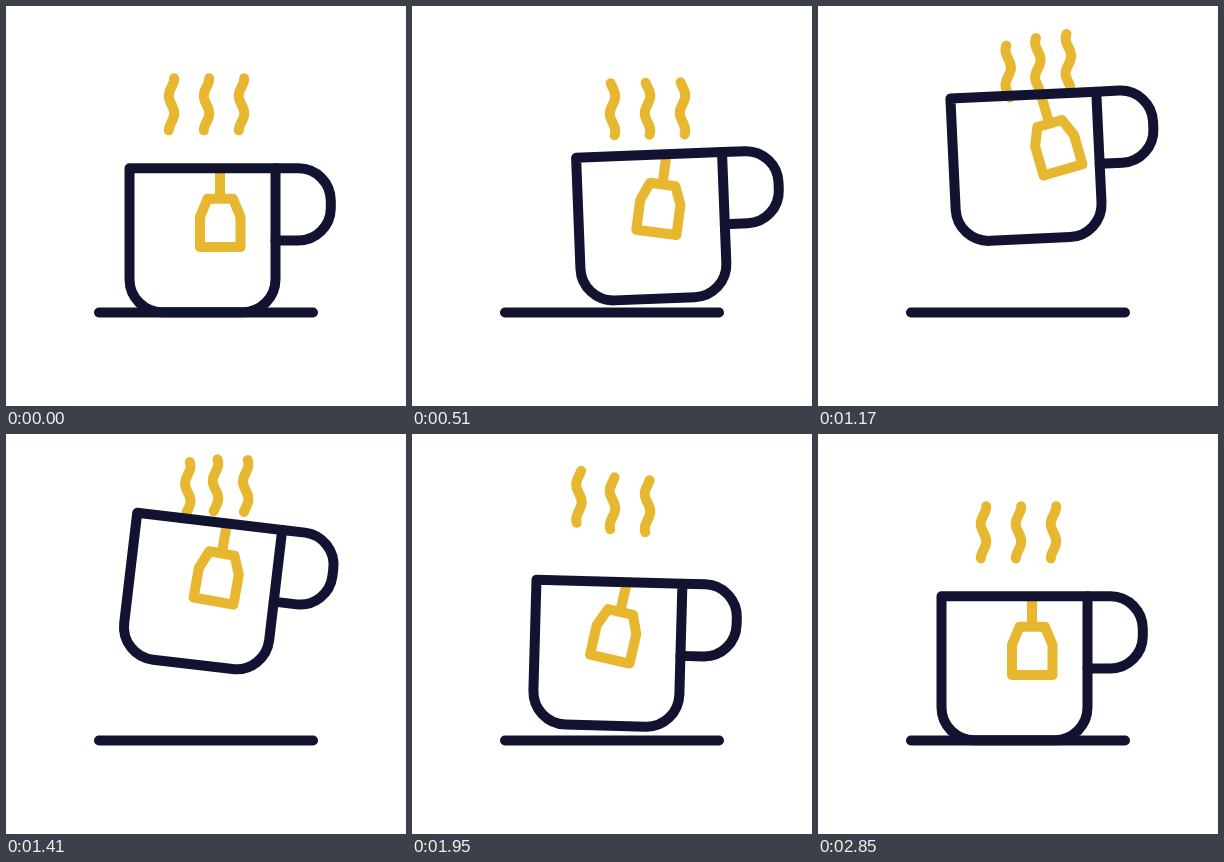
Animation of 400 by 400 pixels, one loop 2910 ms. Source, as an HTML page with a canvas:

```html
<!DOCTYPE html>
<html lang="en">
<head>
<meta charset="utf-8">
<title>Tea cup</title>
<style>
html, body { margin: 0; width: 100%; height: 100%; overflow: hidden; background: #fff; }
canvas { display: block; width: 100vw; height: 100vh; }
</style>
</head>
<body>
<canvas id="stage" width="400" height="400"></canvas>
<script>
const ctx = document.getElementById('stage').getContext('2d');
const LOOP = 2910, STEP = 30, LAST = 2850;
const NAVY = '#121331', GOLD = '#e8b730';
const RAD = Math.PI / 180;

// Sine ease from 0 to 1 between two times.
function ease(t, from, to) {
  const u = Math.min(1, Math.max(0, (t - from) / (to - from)));
  return (1 - Math.cos(Math.PI * u)) / 2;
}

// Swings from one turning point [time, value] to the next.
function swing(t, ...points) {
  let value = points[0][1];
  for (let i = 1; i < points.length; i++) {
    const [t0, v0] = points[i - 1], [t1, v1] = points[i];
    value += (v1 - v0) * ease(t, t0, t1);
  }
  return value;
}

const cupX = t => swing(t, [0, 0], [540, 43.7], [1600, -5], [2100, 0]);
const cupY = t => swing(t, [200, 0], [1330, -77], [2200, 0]);
const cupTilt = t => swing(t, [350, 0], [870, -10.4], [1560, 8.9], [2100, 0]);
const bagSwing = t => swing(t, [0, 0], [370, 12], [990, -24.5], [1670, 26.3], [2300, -6.5], [2700, 0]);

// Steam trails the cup, each wisp by its own lag.
const LAGS = [280, 100, 0];
const steamX = (t, lag) => swing(t, [0, 0], [570, 36], [1650 + 1.8 * lag, 0]);
const steamY = (t, lag) => swing(t, [0, 0], [400, 6], [1300 + lag, -47], [2700, 0]);

// A wave runs down each wisp, three wavelengths in all.
const WAVE = 35, HEIGHT = 52, AMP = 2.7;
const waveShift = t => 3 * WAVE * ease(t, 0, 2220);

function drawSteam(x, y, shift) {
  ctx.beginPath();
  for (let d = 0; d <= HEIGHT; d++) {
    ctx.lineTo(x + AMP * Math.cos(2 * Math.PI * (d - shift) / WAVE), y + d);
  }
  ctx.stroke();
}

// Cup parts are relative to the cup centre, the bag to its pivot on the rim.
const HOME = { x: 196.5, y: 234.3 };
const cupPath = new Path2D('M-73-72H73V39A33 33 0 0 1 40 72H-40A33 33 0 0 1-73 39Z');
const handlePath = new Path2D('M73-72H96A32.5 32.5 0 0 1 128.3-39.5V-32A32.5 32.5 0 0 1 96 .2H73');
const bagPath = new Path2D('M-12.5 30.5H13L20.5 48.5V78.8H-20V48.5Z');
const stringPath = new Path2D('M0 0V30.5');

function drawCup(t) {
  const tilt = cupTilt(t) * RAD;
  ctx.save();
  ctx.translate(HOME.x + cupX(t), HOME.y + cupY(t));
  ctx.rotate(tilt);

  ctx.save();
  ctx.translate(17.5, -72);
  ctx.rotate(bagSwing(t) * RAD - tilt);
  ctx.strokeStyle = GOLD;
  ctx.lineCap = 'butt';
  ctx.stroke(stringPath);
  ctx.stroke(bagPath);
  ctx.restore();

  ctx.strokeStyle = NAVY;
  ctx.stroke(cupPath);
  ctx.stroke(handlePath);
  ctx.restore();
}

function drawTable() {
  ctx.strokeStyle = NAVY;
  ctx.beginPath();
  ctx.moveTo(93, 306.5);
  ctx.lineTo(307, 306.5);
  ctx.stroke();
}

function draw(t) {
  ctx.fillStyle = '#fff';
  ctx.fillRect(0, 0, 400, 400);
  ctx.lineWidth = 10;
  ctx.lineJoin = ctx.lineCap = 'round';

  ctx.strokeStyle = GOLD;
  LAGS.forEach((lag, i) => {
    drawSteam(165.5 + 35 * i + steamX(t, lag), 72.3 + steamY(t, lag), waveShift(t));
  });
  drawCup(t);
  drawTable();
}

const start = performance.now();
function tick() {
  const t = (performance.now() - start) % LOOP;
  draw(Math.min(LAST, Math.floor(t / STEP) * STEP));
  requestAnimationFrame(tick);
}
tick();
</script>
</body>
</html>
```
